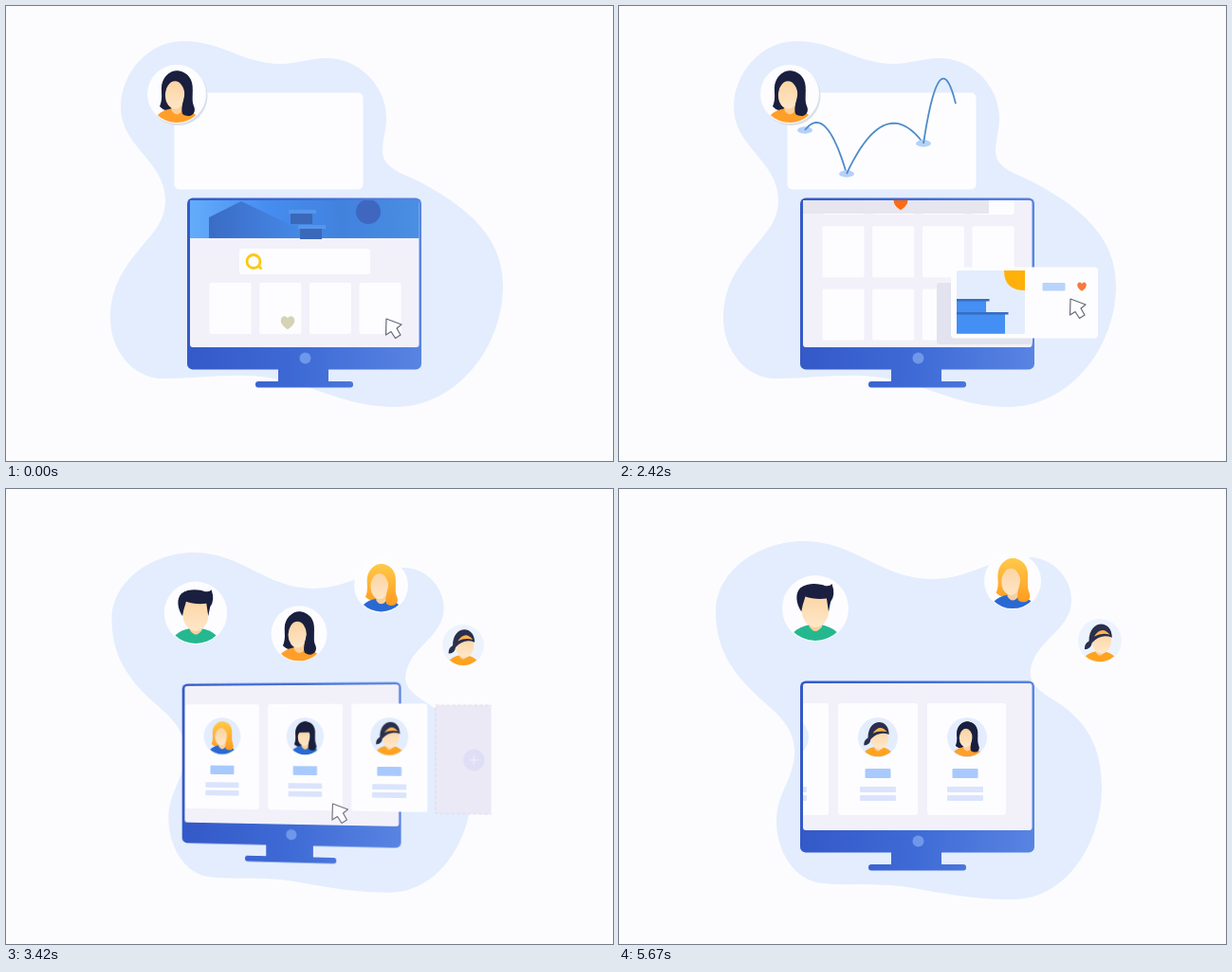
Animation of 640x480 px, one loop 5760 ms. Source, as an HTML page with a canvas:

```html
<!DOCTYPE html>
<html lang="en">
<head>
<meta charset="utf-8">
<title>Storefront loop</title>
<style>
html, body { margin: 0; width: 100%; height: 100%; overflow: hidden; background: #fcfcfe; }
canvas { display: block; width: 640px; height: 480px; }
</style>
</head>
<body>
<canvas id="stage" width="640" height="480"></canvas>
<script>
const LOOP = 5760, W = 640, H = 480;
const PAPER = '#fdfdff', SKY = '#e3edfd', SCREEN = '#f2f1fa', MIST = '#f5f7fd';
const CHIP = '#a8c9fd', LINE = '#dbe4fd', ORANGE = '#ff6b12';
const main = document.getElementById('stage').getContext('2d');
const buffer = document.createElement('canvas');
buffer.width = 700;
buffer.height = H;
const side = buffer.getContext('2d');
let g = main;

const mix = (a, b, k) => a + (b - a) * k;
const clamp = v => Math.max(0, Math.min(1, v));
const ramp = (t, a, b) => {
  const v = clamp((t - a) / (b - a));
  return v * v * (3 - 2 * v);
};
const pulse = (t, a, b, c, d) => ramp(t, a, b) * (1 - ramp(t, c, d));

function faded(alpha, draw) {
  if (alpha <= 0) return;
  g.save();
  g.globalAlpha *= alpha;
  draw();
  g.restore();
}

function box(x, y, w, h, fill, r = 0) {
  g.beginPath();
  g.roundRect(x, y, w, h, r);
  g.fillStyle = fill;
  g.fill();
}

function oval(x, y, rx, ry, fill) {
  g.beginPath();
  g.ellipse(x, y, rx, ry, 0, 0, Math.PI * 2);
  g.fillStyle = fill;
  g.fill();
}

const disc = (x, y, r, fill) => oval(x, y, r, r, fill);

function shape(d, fill) {
  g.fillStyle = fill;
  g.fill(new Path2D(d));
}

function blend(x0, y0, x1, y1, ...stops) {
  const f = g.createLinearGradient(x0, y0, x1, y1);
  stops.forEach((c, i) => f.addColorStop(i / (stops.length - 1), c));
  return f;
}

/* ---------- backdrop: nodes are x, y, heading in degrees ---------- */
const BLOB_A = [[121, 107, -90], [187, 37, 0], [290, 61, 0], [338, 55, 0], [401, 118, 90], [397, 152, 92],
  [437, 186, 28], [524, 295, 90], [410, 423, 180], [300, 397, 195], [165, 393, 180], [110, 330, 270],
  [142, 255, 310], [168, 205, 270]];
const BLOB_B = [[102, 130, -90], [195, 55, 0], [330, 95, 0], [432, 72, 0], [477, 117, 90], [434, 190, 100],
  [468, 229, 36], [509, 315, 90], [415, 433, 180], [310, 421, 190], [215, 416, 185], [166, 350, 270],
  [185, 275, 268], [150, 222, 222]];

function blob(nodes) {
  g.beginPath();
  g.moveTo(nodes[0][0], nodes[0][1]);
  nodes.forEach(([x, y, a], i) => {
    const [u, v, b] = nodes[(i + 1) % nodes.length];
    const reach = 0.38 * Math.hypot(u - x, v - y), rad = Math.PI / 180;
    g.bezierCurveTo(x + reach * Math.cos(a * rad), y + reach * Math.sin(a * rad),
      u - reach * Math.cos(b * rad), v - reach * Math.sin(b * rad), u, v);
  });
  g.fillStyle = SKY;
  g.fill();
}

const grown = t => ramp(t, 3170, 3750);
const slide = t => 45 * pulse(t, 2800, 2990, 2990, 3160);

function backdrop(t) {
  const morph = ramp(t, 2650, 3050), k = grown(t);
  const sx = mix(0.889, 1, k), sy = mix(0.915, 1, k);
  blob(BLOB_A.map(([x, y, a], i) => {
    const [u, v, b] = BLOB_B[i];
    return [mix(x, 246 + (u - 246) * sx + slide(t), morph), mix(y, 290 + (v - 290) * sy, morph), mix(a, b, morph)];
  }));
}

/* ---------- people, drawn in a unit circle ---------- */
const DARK = '#1a1f3f', BLUE = '#2a69d2', GOLD = '#ffa31f';
const skin = () => blend(0, -0.5, 0, 0.6, '#fcd3a0', '#fee8cb');

function bust(shirt, x, rx, ry) {
  oval(0, 1, 0.78, 0.52, shirt);
  shape('M-.18 .3H.2V.55Q0 .82-.18 .55Z', '#fbcf9b');
  oval(x, 0.03, rx, ry, skin());
}

function longHair(hair, shirt) {
  shape('M-.52-.2C-.5-.95 .5-.98 .54-.25L.5 .6L-.2 .5C-.35 .62-.5 .5-.58 .42C-.48 .2-.52 0-.52-.2Z', hair);
  bust(shirt, -0.06, 0.33, 0.47);
  shape('M-.51-.1C-.5-1.03 .5-1.03 .53-.1L.3-.1C.3-.35 .2-.5 .05-.52C-.2-.5-.35-.35-.38-.1Z', hair);
  shape('M.28-.2C.3 .15 .1 .45 .2 .68C.45 .85 .7 .65 .58 .4C.5 .2 .56 0 .52-.2Z', hair);
}

const PEOPLE = {
  man() {
    bust('#25b890', 0, 0.41, 0.54);
    shape('M-.42 .1C-.58-.15-.62-.45-.45-.62C-.2-.8 .15-.74 .3-.68Q.45-.66 .5-.74Q.62-.4 .46-.2L.4 .1L.34-.3C.1-.27-.15-.3-.3-.36L-.38-.1Z', DARK);
  },
  ann: () => longHair(DARK, '#ff9f2a'),
  blonde: () => longHair(blend(0, -0.8, 0, 0.8, '#ffc94a', '#ff9a1e'), BLUE),
  blue() {
    longHair(DARK, BLUE);
    shape('M-.45 0C-.45-.8 .45-.8 .45 0L.28-.22L-.3-.2Z', DARK);
  },
  cap() {
    bust(GOLD, 0.08, 0.44, 0.56);
    shape('M-.5 .02C-.5-.98 .55-1 .56-.14Q.05-.34-.36 .1Q-.4 .4-.7 .4Q-.72 .14-.5 .02Z', '#2a2f4e');
    shape('M-.26-.2Q.1-.72 .46-.27Q.1-.38-.26-.2Z', '#ffb451');
  }
};

function avatar(who, x, y, r, fill = PAPER) {
  if (r < 0.5) return;
  g.save();
  g.translate(x, y);
  g.scale(r, r);
  disc(0, 0, 1, fill);
  g.beginPath();
  g.arc(0, 0, 0.97, 0, Math.PI * 2);
  g.clip();
  PEOPLE[who]();
  g.restore();
}

/* ---------- small parts ---------- */
function heart(x, y, s, fill) {
  g.save();
  g.translate(x, y);
  g.scale(s, s);
  shape('M0 1C-.5 .65-1 .25-1-.3C-1-1-.25-1.15 0-.6C.25-1.15 1-1 1-.3C1 .25 .5 .65 0 1Z', fill);
  g.restore();
}

function pointer(x, y) {
  g.save();
  g.translate(x, y);
  const p = new Path2D('M0 0L16 6L11 10L15 17L9.5 20.5L5 13.5L-.5 17Z');
  g.fillStyle = PAPER;
  g.fill(p);
  g.lineWidth = 1.2;
  g.lineJoin = 'round';
  g.strokeStyle = '#666a78';
  g.stroke(p);
  g.restore();
}

/* ---------- computer ---------- */
function computer() {
  const steel = blend(191, 0, 438, 0, '#3459c8', '#3f6bd6', '#5984e2');
  box(287, 382, 53, 16, steel);
  box(263, 396, 103, 6.5, steel, 3);
  box(191, 202.5, 247, 181, steel, 6);
  box(194, 205, 241.5, 155, SCREEN, 3);
  disc(315.5, 371.5, 6, '#6f97ea');
}

function clipScreen(right, draw) {
  g.save();
  g.beginPath();
  g.rect(194, 205, right - 194, 155);
  g.clip();
  draw();
  g.restore();
}

function shopPage(t) {
  const scroll = 72 * ramp(t, 450, 950) + 54 * ramp(t, 1900, 2350);
  g.save();
  g.translate(0, -scroll);
  box(194, 205, 242, 40, blend(194, 0, 436, 0, '#64acfa', '#468df0', '#4182dd', '#4a8fe2'));
  shape('M214 245V223L248 206L330 245Z', blend(214, 0, 320, 0, '#3a6cc5', '#478bea'));
  [[300, 215], [310, 231]].forEach(([x, y]) => {
    box(x - 2, y, 29, 4, '#5696ea');
    box(x, y + 4, 23, 11, '#3b68b8');
  });
  disc(382, 217, 13, '#3f67c0');
  box(246, 256, 138, 27, PAPER, 3);
  g.strokeStyle = '#fbc817';
  g.lineWidth = 2.8;
  g.beginPath();
  g.arc(261, 269.5, 7, 0, Math.PI * 2);
  g.moveTo(266, 274);
  g.lineTo(269.5, 277.5);
  g.stroke();
  for (let i = 0; i < 20; i++)
    box(214.5 + (i % 4) * 52.7, 292 + Math.floor(i / 4) * 66.3, 44, 54, PAPER, 2);
  g.restore();
  faded(clamp(scroll / 72), () => box(194, 205, 196, 14, '#e7e6ee'));
  heart(297, 334 - scroll, 7.3, '#d6d2b4');
  faded(ramp(t, 50, 420), () => heart(297, 334 - scroll, 7.3, ORANGE));
}

function details(x, y) {
  box(x - 13.5, y, 27, 10, CHIP, 1);
  [19, 28].forEach(dy => box(x - 19, y + dy, 38, 6, LINE, 1));
}

function team(t) {
  const x0 = 195.5 - 256.5 * ramp(t, 3170, 3780) + 10 * ramp(t, 4000, 4500);
  ['man', 'blonde', 'blue', 'cap'].forEach((who, i) => {
    const x = x0 + i * 94;
    box(x, 226, 84, 118, PAPER, 3);
    avatar(who, x + 42, 262, 21, SKY);
    details(x + 42, 295);
  });
  const x = x0 + 375;
  faded(1 - ramp(t, 4900, 5100), () => {
    box(x, 228, 84, 117, '#ebe9f6', 3);
    g.strokeStyle = '#dcdcec';
    g.lineWidth = 1.2;
    g.setLineDash([4, 2]);
    g.strokeRect(x, 228, 84, 117);
    faded(ramp(t, 3200, 3600), () => {
      disc(x + 42, 287, 11.5, '#d6d8f6');
      box(x + 37, 286, 10, 2, SCREEN);
      box(x + 41, 282, 2, 10, SCREEN);
    });
  });
}

function desk(t, tilt) {
  computer();
  faded(1 - ramp(t, 2650, 2900), () => clipScreen(435.5, () => shopPage(t)));
  faded(ramp(t, 2800, 3050), () => clipScreen(435.5 + 170 * tilt, () => team(t)));
}

// Column by column projection of the flat drawing.
function tilted(t, q) {
  g = side;
  g.clearRect(0, 0, 700, H);
  desk(t, q);
  g = main;
  const a = 191 - 9 * q, b = 247 - 35 * q, c = 8 * q;
  const toU = x => 2 * (x - a) / (b + Math.sqrt(b * b + 4 * c * (x - a)));
  for (let x = 170; x < 600; x++) {
    const u = toU(x), sx = 191 + 247 * u, sw = 247 * (toU(x + 1) - u);
    if (sx + sw > 700) break;
    const s = mix(1, 0.878 + 0.066 * u, q), top = 203 + q * (5 - 3 * u);
    g.drawImage(buffer, sx, 0, sw, H, x, top - 203 * s, 1, H * s);
  }
}

/* ---------- first half: chart and product card ---------- */
const STOPS = [[196, 131], [240, 177], [321, 145], [355, 103]];

function hop(i, k) {
  const [x0, y0] = STOPS[i], [x1, y1] = STOPS[i + 1], lift = 26 + 9.5 * i;
  g.beginPath();
  for (let s = 0; s <= k; s += k / 32) g.lineTo(mix(x0, x1, s), mix(y0, y1, s) - 4 * lift * s * (1 - s));
  g.strokeStyle = '#4f8ccb';
  g.lineWidth = 1.8;
  g.stroke();
}

function chart(t) {
  const out = ramp(t, 2600, 2900);
  faded(1 - out, () => {
    g.translate(0, -70 * out);
    box(177.5, 91.5, 199, 102, PAPER, 5);
    for (let i = 0; i < 3; i++) {
      const from = 530 + 700 * i, pop = ramp(t, from - 100, from);
      oval(...STOPS[i], 8 * pop, 3.7 * pop, '#b5d0fa');
      const k = ramp(t, from, from + 450);
      if (k > 0) hop(i, k);
    }
  });
}

function product(t) {
  const k = ramp(t, 1400, 1850);
  faded(k * (1 - ramp(t, 2550, 2850)), () => {
    const s = mix(0.3, 1, k);
    g.translate(mix(342, 428, k), mix(318, 313, k));
    g.scale(s, s);
    g.translate(-428, -313);
    box(335, 292, 101, 65, '#e2e3ee', 3);
    box(350, 275.5, 155, 75, PAPER, 4);
    box(356, 279, 72, 67, SKY, 2);
    shape('M406 279H428V300Q406 300 406 279Z', '#ffb009');
    [[31, 309], [51, 323]].forEach(([w, y]) => {
      box(356, y, w, 23 - (y - 309) * 0.01, '#438ff4');
      box(356, y, w + 3.5, 2.5, '#376dc0');
    });
    box(446.5, 292, 24, 8.5, '#b9d4fc', 1);
    heart(488, 296, 4.8, t > 2120 ? '#f8783d' : '#d8dde8');
  });
}

/* ---------- second half: crowd and new member ---------- */
const CROWD = { man: [207, 126, 35], blonde: [415, 97, 30], cap: [507, 160, 23] };

// Where a bubble floats while the scene is still drawing nearer.
function floating([x, y, r], t) {
  const k = grown(t);
  return [mix(0.9 * x + 9, x, k), mix(y + 8, y, k), mix(0.9 * r + 0.5, r, k)];
}

function crowd(t) {
  Object.keys(CROWD).forEach((who, i) => {
    const [x, y, r] = floating(CROWD[who], t), from = 2830 + 40 * i;
    avatar(who, x + slide(t), y, r * ramp(t, from, from + 240), who === 'cap' ? '#edf3fd' : PAPER);
  });
  if (t >= 4600) return;
  const join = ramp(t, 2600, 3100), fly = ramp(t, 4200, 4600);
  const home = floating([323, 148, 31], t);
  const [x, y, r] = [180, 93, 31].map((v, i) => mix(mix(v, home[i], join), [364, 230, 24][i], fly));
  faded(1 - join, () => disc(x + 1.5, y + 2, r, '#d8dfec'));
  avatar('ann', x, y, r);
}

function member(t) {
  const drop = ramp(t, 4670, 5030);
  faded(ramp(t, 4300, 4620), () => {
    box(mix(321, 325, drop), mix(198, 226, drop), mix(89, 83, drop), mix(129, 118, drop), PAPER, 3);
    const spot = [mix(364, 367, drop), mix(230, 262, drop), mix(24, 21, drop)];
    if (t >= 4600) avatar('ann', ...spot);
    faded(ramp(t, 4800, 5050), () => avatar('ann', ...spot, SKY));
    faded(ramp(t, 4900, 5150), () => details(365, 295));
  });
}

// Arrival time and place of each pointer stop.
const VISITS = [[0, 401, 330], [400, 297, 334], [1000, 315, 339], [1300, 338, 322], [2000, 487, 296],
  [2420, 476, 309], [3000, 353, 332], [3700, 273, 332], [4100, 353, 286]];

function drawPointer(t) {
  let x = 0, y = 0;
  for (const [when, px, py] of VISITS) {
    const k = ramp(t, when - 350, when);
    x = mix(x, px, when ? k : 1);
    y = mix(y, py, when ? k : 1);
  }
  const dim = 0.5 * pulse(t, 2650, 2950, 3200, 3500);
  faded(0.45 * pulse(t, 3600, 3780, 3860, 3980), () => pointer(353, 320));
  faded((1 - dim) * (1 - ramp(t, 4150, 4300)), () => pointer(x, y));
}

function afterglow(t) {
  faded(pulse(t, 2990, 3130, 3190, 3400), () => {
    oval(497, 141, 51, 59, MIST);
    oval(470, 200, 62, 30, MIST);
    faded(0.2, () => avatar('cap', 516, 158, 18));
  });
}

function render(t) {
  g = main;
  g.fillStyle = '#fcfcfe';
  g.fillRect(0, 0, W, H);
  afterglow(t);
  backdrop(t);
  chart(t);
  const tilt = pulse(t, 2600, 2980, 3190, 3720);
  if (tilt > 0.001) tilted(t, tilt);
  else desk(t, 0);
  product(t);
  crowd(t);
  member(t);
  drawPointer(t);
}

const start = performance.now();
function tick(now) {
  render(Math.max(0, now - start) % LOOP);
  requestAnimationFrame(tick);
}
render(0);
requestAnimationFrame(tick);
</script>
</body>
</html>
```
